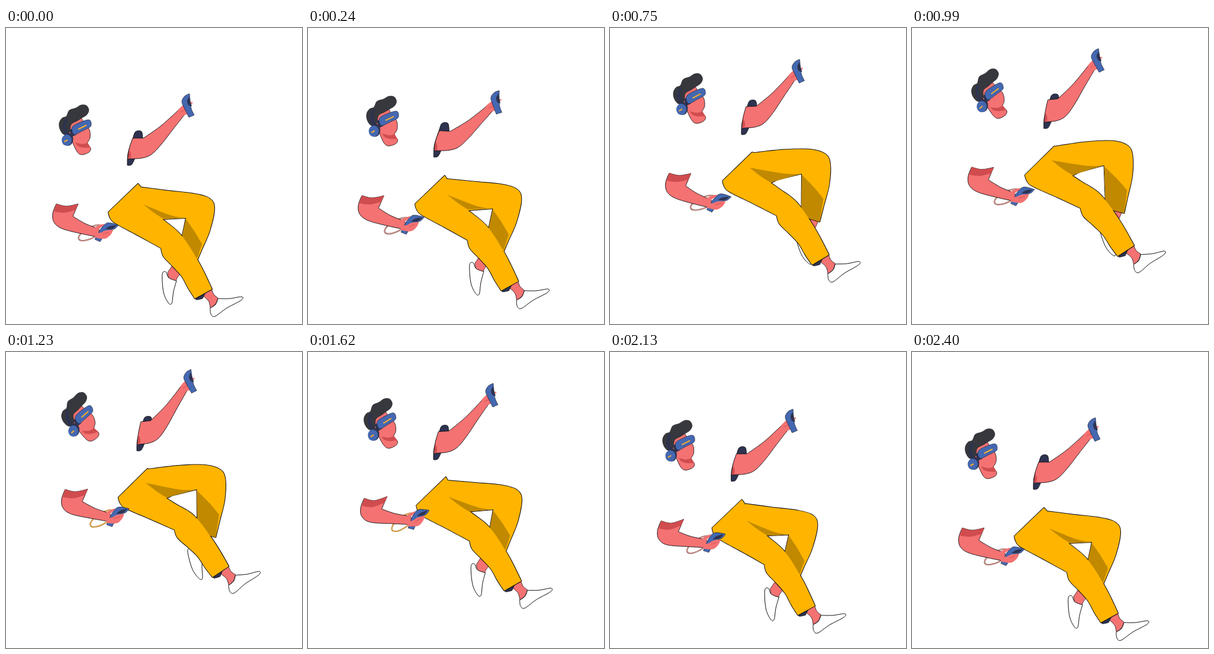
An HTML page with a canvas for the animation above (2430 ms loop, 500x500 px).

```html
<!DOCTYPE html>
<html lang="en">
<head>
<meta charset="utf-8">
<title>Floating VR player</title>
<style>
  html, body { margin: 0; width: 100%; height: 100%; overflow: hidden; background: #fff; }
  canvas { display: block; width: 100vw; height: 100vh; }
</style>
</head>
<body>
<canvas id="stage" width="500" height="500"></canvas>
<script>
const ctx = document.getElementById('stage').getContext('2d');

const STEP = 30, STEPS = 81, CYCLE = 2400;
const KEYS = [0, 450, 750, 1230, 1620, 1860];

const SKIN = '#f47272', SKIN_DARK = '#d04c4e', YELLOW = '#ffb400', OCHRE = '#c08900';
const BLUE = '#4468b1', NAVY = '#2d3350', HAIR = '#36383d', ORANGE = '#ffae2a';
const INK = '#0c0c10', WHITE = '#fff';

// Pose tracks: one value per key time, joined by a periodic spline.
const tracks = {
  body:     { x: [0, 15, 17, 16, 10, 4],      y: [0, -32, -53, -66, -52, -37] },
  waist:    { x: [0, 13, 16, 12, 8, 3],       y: [0, -33, -58, -71, -52, -36] },
  head:     { x: [0, 16, 18, 11, 7, 3],       y: [0, -34, -52, -56, -49, -37],  a: [0, .02, -.03, -.27, -.09, -.04] },
  leg:      { a: [0, 0, -.033, -.085, -.015, .008] },
  knee:     { x: [0, 16, 20, 18.5, 9, 2],     y: [0, -39, -75, -89, -55, -37],  a: [0, -.02, -.15, -.165, -.02, .01] },
  foot:     { x: [0, 16, 22, 20, 9, 2],       y: [0, -39, -75, -89, -55, -37],  a: [0, -.05, -.23, -.19, -.02, 0] },
  fold:     { x: [0, 5, 4, 4, 5, 0],          y: [0, -37.5, -62, -77, -53.5, -37] },
  shoulder: { x: [0, 14, 17, 16, 7, 3],       y: [0, -32, -52, -65, -50, -36.5] },
  hand:     { x: [0, 17, 10.5, 4, 3, 1],      y: [0, -22, -58, -81, -58, -39],  a: [0, .15, 0, -.05, 0, .04] },
  sleeve:   { x: [0, 12, 15, 15, 10, 6],      y: [0, -32, -52, -65, -50, -34] },
  grip:     { x: [0, 13, 14, 19, 17, 15],     y: [0, -31, -49, -67, -63, -54],  a: [0, -.05, .06, -.08, -.16, -.2] }
};

function sample(values, t) {
  const n = KEYS.length;
  const time = i => KEYS[(i + n) % n] + Math.floor(i / n) * CYCLE;
  const value = i => values[(i + n) % n];
  const slope = i => {
    const h0 = time(i) - time(i - 1), h1 = time(i + 1) - time(i);
    return ((value(i) - value(i - 1)) / h0 * h1 + (value(i + 1) - value(i)) / h1 * h0) / (h0 + h1);
  };
  let i = n - 1;
  while (KEYS[i] > t) i--;
  const h = time(i + 1) - time(i), u = (t - time(i)) / h, v = 1 - u;
  return v * v * (1 + 2 * u) * value(i) + u * v * v * h * slope(i)
       + u * u * (3 - 2 * u) * value(i + 1) - u * u * v * h * slope(i + 1);
}

function poseAt(t) {
  const pose = {};
  for (const [name, track] of Object.entries(tracks)) {
    pose[name] = { x: 0, y: 0, a: 0 };
    for (const axis in track) pose[name][axis] = sample(track[axis], t);
  }
  return pose;
}

// "x y" pairs split by commas; "!" marks a sharp corner.
const shape = text => text.split(',').map(item => {
  const [x, y] = item.trim().split(' ').map(parseFloat);
  return { x, y, sharp: item.includes('!') };
});

const shapes = {
  hair: shape('98 180,91 171,90 160,95 152,102 149,107 139,118 135,127 130,136 131,140 139,136 147,128 152,120 157,110 163,107 176'),
  face: shape('104 170!,110 160,118 156,127 151!,132 160,141 172,142 185,138 193,136 197,143 203,140 210,128 214,120 209,112 192'),
  chin: shape('117 193!,128 196,138 194!,143 202!,130 202,121 199'),
  band: shape('100 153!,104 154,101 164,105 178!,100 180!,96 168'),
  strapBase: shape('107 172!,114 169!,119 180!,111 184!'),
  goggles: shape('114 165,126 159,138 155,143 157,144 164,141 168,129 174,117 180,113 178,111 171'),

  rearSleeve: shape('205 232!,206 212,214 187,219 175,229 175,231 188!,217 222!,212 231'),
  raisedArm: shape('214 186!,232 186!,262 165,293 137!,302 146!,283 170,262 197,245 214,228 220,206 221!,208 204'),
  armShade: shape('206 221!,208 207,211 213,210 221!'),
  raisedHand: shape('290 139!,298 131,303 130,305 138,306 145,298 148!'),
  pointer: shape('310 111!,302 115,297 124,301 135,309 151!,318 147!,313 136,311 122'),
  pointerDark: shape('309 116!,311 123,314 132!,309 131,306 124'),

  loweredArm: shape('79 313,85 297!,102 301,122 297!,113 318!,133 330,156 339!,166 355!,130 348,95 339,81 328'),
  sleeveShade: shape('85 297!,102 301,122 297!,118 307!,99 312,81 310!'),
  grip: shape('161 338,172 329,190 333!,184 339,172 343,165 352,159 361!,150 357!,155 348'),
  gripDark: shape('168 340!,175 335,187 333!,180 339'),
  gripHand: shape('146 343!,158 346,168 342,181 341!,177 349,167 356,151 354!'),
  thumb: shape('143 342!,155 334,166 331,163 335,151 344!'),

  frontLeg: shape('223 263!,173 311!,176 321,185 330,224 351,262 372!,266 386,281 402,297 420,308 440,319 457!,348 441!,326 396,297 351,267 325,233 300!'),
  waist: shape('228 269!'),
  thighTop: shape('228 269!,275 275,318 280,344 288,352 305'),
  calf: shape('344 343,330 376,319 402!,290 388!'),
  thighBase: shape('304 321!,265 323!,225 335!'),
  calfShadeStart: shape('304 323!'),
  calfShade: shape('318 343,331 365!,319 402!,290 388!'),
  foldStart: shape('232 298!'),
  foldTop: shape('277 316,304 321!'),
  foldEnd: shape('267 323!,250 312'),
  cuff: shape('319 456!,322 459,332 457!,338 445!'),
  frontAnkle: shape('330 450!,347 440!,351 450,358 456!,354 466,345 473!,342 461'),
  frontShoe: shape('345 473!,354 467,358 457!,378 457,398 454,397 460,373 473,353 487,346 483'),
  backAnkle: shape('290 388!,308 398!,290 421,288 427!,275 425!,273 413!'),
  backShoe: shape('264 416,270 412,275 422,288 427!,283 445,280 465,274 464,266 446')
};

const clamp = w => Math.min(1, Math.max(0, w));
const shift = d => p => ({ ...p, x: p.x + d.x, y: p.y + d.y });

// Moves by d and turns about a pivot; weight can ease the turn in along a part.
const rigid = (px, py, d, weight = () => 1) => p => {
  const a = d.a * weight(p), c = Math.cos(a), s = Math.sin(a), x = p.x - px, y = p.y - py;
  return { ...p, x: px + d.x + x * c - y * s, y: py + d.y + x * s + y * c };
};

// Moves points along a limb from the offset at its root to the offset at its end.
const limb = (ax, ay, bx, by, from, to) => {
  const dx = bx - ax, dy = by - ay, len2 = dx * dx + dy * dy;
  return p => {
    const w = clamp(((p.x - ax) * dx + (p.y - ay) * dy) / len2);
    return { ...p, x: p.x + from.x + w * (to.x - from.x), y: p.y + from.y + w * (to.y - from.y) };
  };
};

function outline(points) {
  const n = points.length, path = new Path2D();
  const tangent = i => {
    const p = points[i], a = points[(i + n - 1) % n], b = points[(i + 1) % n];
    return p.sharp ? [0, 0] : [(b.x - a.x) / 6, (b.y - a.y) / 6];
  };
  path.moveTo(points[0].x, points[0].y);
  for (let i = 0; i < n; i++) {
    const j = (i + 1) % n, p = points[i], q = points[j], u = tangent(i), v = tangent(j);
    path.bezierCurveTo(p.x + u[0], p.y + u[1], q.x - v[0], q.y - v[1], q.x, q.y);
  }
  path.closePath();
  return path;
}

function stroke(path, color, width) {
  ctx.strokeStyle = color;
  ctx.lineWidth = width;
  ctx.stroke(path);
}

function paint(points, fill, line = 0) {
  const path = outline(points);
  ctx.fillStyle = fill;
  ctx.fill(path);
  if (line) stroke(path, INK, line);
}

function dash(map, x1, y1, x2, y2, color, width) {
  const a = map({ x: x1, y: y1 }), b = map({ x: x2, y: y2 }), path = new Path2D();
  path.moveTo(a.x, a.y);
  path.lineTo(b.x, b.y);
  stroke(path, color, width);
}

function disc(map, x, y, rx, ry, color) {
  const c = map({ x, y });
  ctx.fillStyle = color;
  ctx.beginPath();
  ctx.ellipse(c.x, c.y, rx, ry, 0, 0, 7);
  ctx.fill();
}

function drawHead(pose) {
  const map = rigid(103, 189, pose.head);
  const part = (name, fill, line) => paint(shapes[name].map(map), fill, line);
  part('face', SKIN, .8);
  part('chin', SKIN_DARK);
  part('hair', HAIR, .5);
  part('band', NAVY);
  part('strapBase', NAVY);
  part('goggles', BLUE, .5);
  dash(map, 122, 171, 136, 164, ORANGE, 2);
  disc(map, 105, 188, 8.5, 11, NAVY);
  disc(map, 102.5, 189.5, 8.5, 9.5, BLUE);
  dash(map, 98.5, 192, 104, 189, ORANGE, 2);
}

function drawRaisedArm(pose) {
  const arm = limb(210, 215, 297, 142, pose.shoulder, pose.hand);
  const hand = rigid(300, 140, pose.hand);
  paint(shapes.rearSleeve.map(shift(pose.shoulder)), NAVY, .8);
  paint(shapes.raisedArm.map(arm), SKIN, .9);
  paint(shapes.armShade.map(arm), SKIN_DARK);
  paint(shapes.raisedHand.map(hand), SKIN);
  dash(hand, 310, 128, 315, 126, SKIN, 2.5);
  paint(shapes.pointer.map(hand), BLUE, .6);
  paint(shapes.pointerDark.map(hand), NAVY);
  dash(hand, 295, 142, 302, 138, SKIN_DARK, 1);
  dash(hand, 299, 145, 304, 142, SKIN, 3);
}

function drawLoweredArm(pose, t) {
  const arm = limb(95, 320, 160, 348, pose.sleeve, pose.grip);
  const hand = rigid(172, 346, pose.grip);
  const center = hand({ x: 143.5, y: 346 });
  const loop = new Path2D();
  loop.ellipse(center.x, center.y, 23, 9, -.47 + pose.grip.a, 0, Math.PI * 2);
  const golden = t > 1000 && t < 1740;
  stroke(loop, golden ? '#a87425' : '#86514c', 2.3);
  stroke(loop, golden ? '#ffc365' : '#f0b3aa', 1);
  paint(shapes.loweredArm.map(arm), SKIN, .9);
  paint(shapes.sleeveShade.map(arm), SKIN_DARK);
  paint(shapes.grip.map(hand), BLUE, .6);
  paint(shapes.gripDark.map(hand), NAVY);
  paint(shapes.thumb.map(hand), SKIN);
  paint(shapes.gripHand.map(hand), SKIN);
  dash(hand, 164, 348, 174, 345, SKIN_DARK, .9);
}

function drawLegs(pose) {
  const front = rigid(200, 290, { ...pose.body, a: pose.leg.a }, p => clamp((p.y - 290) / 60));
  const thigh = limb(228, 300, 298, 300, pose.waist, pose.knee);
  const calf = rigid(328, 301, pose.knee);
  const foot = rigid(328, 301, pose.foot);
  const fold = shift(pose.fold);

  paint(shapes.backAnkle.map(foot), SKIN, .7);
  paint(shapes.backShoe.map(foot), WHITE, 1);

  const backLeg = [...shapes.thighTop.map(thigh), ...shapes.calf.map(calf), ...shapes.thighBase.map(thigh)];
  const frontLeg = [...shapes.frontLeg.map(front), ...shapes.waist.map(shift(pose.waist))];

  stroke(outline(backLeg), INK, 2);
  paint(backLeg, YELLOW);
  paint([...shapes.calfShadeStart.map(thigh), ...shapes.calfShade.map(calf)], OCHRE);

  paint(shapes.frontAnkle.map(front), SKIN, .8);
  paint(shapes.frontShoe.map(front), WHITE, 1);
  paint(shapes.cuff.map(front), NAVY, .8);

  // The front leg gets its line only where it does not overlap the back leg.
  ctx.save();
  const beyond = new Path2D();
  beyond.rect(0, 0, 500, 500);
  beyond.addPath(outline(backLeg));
  ctx.clip(beyond, 'evenodd');
  stroke(outline(frontLeg), INK, 2);
  ctx.restore();
  paint(frontLeg, YELLOW);
  paint([...shapes.foldStart.map(fold), ...shapes.foldTop.map(thigh), ...shapes.foldEnd.map(fold)], OCHRE);
}

function render(now) {
  const t = Math.floor(now / STEP) % STEPS * STEP % CYCLE;
  const pose = poseAt(t);
  ctx.fillStyle = WHITE;
  ctx.fillRect(0, 0, 500, 500);
  ctx.lineJoin = 'round';
  drawLegs(pose);
  drawLoweredArm(pose, t);
  drawRaisedArm(pose);
  drawHead(pose);
}

function tick() {
  render(performance.now());
  requestAnimationFrame(tick);
}
tick();
</script>
</body>
</html>
```
